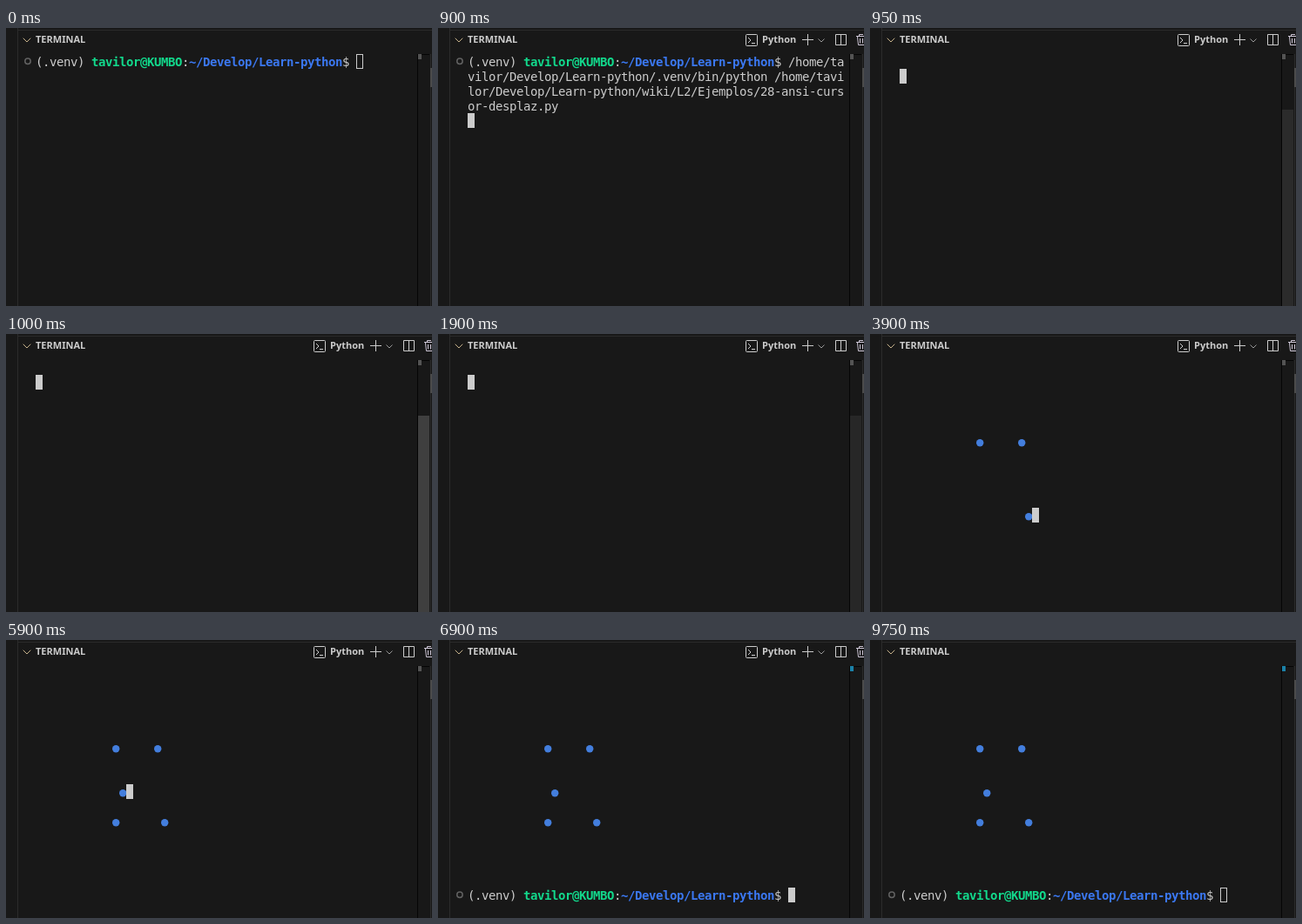
Recreate the animation shown at these times as an HTML page. Size 489 px wide and 320 px high, loop 9800 ms.

```html
<!DOCTYPE html>
<html lang="en">
<head>
<meta charset="utf-8">
<title>Terminal</title>
<style>
  html, body { margin: 0; width: 100%; height: 100%; overflow: hidden; background: #181818; }
  svg { display: block; width: 489px; height: 320px; }
  text { white-space: pre; fill: #ccc; }
  .mono { font: 14px "DejaVu Sans Mono", monospace; }
  .bold { font-weight: 700; }
  .ui { font: 600 11px "Noto Sans", "Open Sans", sans-serif; }
  .user { fill: #12d98c; }
  .path { fill: #3b78f2; }
  .dot { fill: #437edd; }
  .icon { fill: none; stroke: #ccc; }
</style>
</head>
<body>
<svg id="stage" viewBox="0 0 489 320" xmlns="http://www.w3.org/2000/svg">
  <rect width="489" height="320" fill="#181818"/>
  <path d="M13.5 0V320M13 2.5H489M487.5 30V320" stroke="#2b2b2b"/>
  <path d="M472.5 30V320M473 30.5H486" stroke="#050505"/>
  <rect x="487" y="46" width="2" height="22" fill="#4b4b4b"/>

  <path class="icon" d="M19.7 11.7L24 16L28.3 11.7" style="stroke:#c8b48c"/>
  <text class="ui" x="34" y="17">TERMINAL</text>

  <g id="tools">
    <rect class="icon" x="353.5" y="7.5" width="13" height="13" rx="1"/>
    <path class="icon" d="M356 11L359 14L356 17M360 17.5H364"/>
    <text class="ui" x="372" y="17">Python</text>
    <path class="icon" d="M418 13.5H431M424.5 7V20"/>
    <path class="icon" d="M436.5 12.5L440 16L443.5 12.5" style="stroke:#999"/>
    <path class="icon" d="M456.5 7.5H468.5V19.5H456.5ZM462.5 7.5V19.5"/>
    <path class="icon" d="M480 9.5H491M483.5 9V7.5H488M481.5 10L482.5 19.5H490M484.5 12V17.5M487.5 12V17.5" style="stroke:#cfc8d8"/>
  </g>

  <rect id="slider" x="473" y="94" width="13" height="226" fill="#3f3f3f"/>
  <rect id="mark" x="473" y="30" width="4" height="6"/>
  <g id="screen"></g>
  <rect id="cursor"/>
</svg>
<script>
const LOOP = 9800, CELL = 8, ROW = 17, LEFT = 34, TOP = 30;
const $ = id => document.getElementById(id);
const colX = c => LEFT + c * CELL;
const rowY = r => TOP + r * ROW;

function add(parent, tag, attrs, content = '') {
  const el = document.createElementNS('http://www.w3.org/2000/svg', tag);
  for (const k in attrs) el.setAttribute(k, attrs[k]);
  el.textContent = content;
  return parent.appendChild(el);
}

// Terminal text sits on a fixed character grid.
function print(parent, col, row, str, cls = '') {
  const x = [...str].map((_, i) => colX(col + i)).join(' ');
  add(parent, 'text', { class: 'mono ' + cls, x, y: rowY(row) + 13.6 }, str);
}

function prompt(row) {
  const g = add($('screen'), 'g', {});
  add(g, 'circle', { cx: 25, cy: rowY(row) + 8.3, r: 3.2, fill: 'none', stroke: '#626262', 'stroke-width': 1.5 });
  print(g, 0, row, '(.venv)');
  print(g, 8, row, 'tavilor@KUMBO', 'bold user');
  print(g, 21, row, ':');
  print(g, 22, row, '~/Develop/Learn-python', 'bold path');
  print(g, 44, row, '$');
  return g;
}

const first = prompt(0), last = prompt(15);
const command = add($('screen'), 'g', {});
print(command, 46, 0, '/home/ta');
['vilor/Develop/Learn-python/.venv/bin/python /home/tavi',
 'lor/Develop/Learn-python/wiki/L2/Ejemplos/28-ansi-curs',
 'or-desplaz.py'].forEach((s, i) => print(command, 0, i + 1, s));

const dots = [[11, 5], [17, 5], [18, 10], [11, 10], [12, 8]].map(([c, r]) =>
  add($('screen'), 'circle', { class: 'dot', cx: colX(c) + 4.2, cy: rowY(r) + 10.3, r: 4.2 }));

// time, cursor column, cursor row, slider opacity, dots shown, phase
const steps = [
  [0, 46, 0, 0, 5, 'idle'],
  [850, 46, 0, 0, 0, 'focus'],
  [900, 0, 4, 0, 0, 'typed'],
  [950, 0, 1, .5, 0, 'run'],
  [1000, 0, 1, 1, 0, 'run'],
  [1900, 0, 1, .4, 0, 'run'],
  [1950, 12, 5, 0, 1, 'run'],
  [2900, 18, 5, 0, 2, 'run'],
  [3900, 19, 10, 0, 3, 'run'],
  [4900, 12, 10, 0, 4, 'run'],
  [5900, 13, 8, 0, 5, 'run'],
  [6900, 46, 15, 0, 5, 'done'],
  [9750, 46, 15, 0, 5, 'blur']
];
steps[0][4] = 0;

const show = (el, on) => el.style.display = on ? '' : 'none';

function render(t) {
  const [, col, row, slide, count, phase] = steps.findLast(s => s[0] <= t);
  const is = (...names) => names.includes(phase);
  const hollow = is('idle', 'blur'), ended = is('done', 'blur');
  show(first, is('idle', 'focus', 'typed'));
  show(command, is('typed'));
  show(last, ended);
  show($('tools'), !hollow);
  dots.forEach((d, i) => show(d, i < count));
  $('slider').style.opacity = slide;
  $('mark').style.fill = ended ? '#1b81a8' : '#545454';
  const inset = hollow ? .5 : 0;
  const box = { x: colX(col) + inset, y: rowY(row) + inset, width: CELL - 2 * inset, height: ROW - 2 * inset,
    fill: hollow ? 'none' : '#ccc', stroke: hollow ? '#ccc' : 'none' };
  for (const k in box) $('cursor').setAttribute(k, box[k]);
}

const start = performance.now();
function tick() {
  render((performance.now() - start) % LOOP);
  requestAnimationFrame(tick);
}
tick();
</script>
</body>
</html>
```
